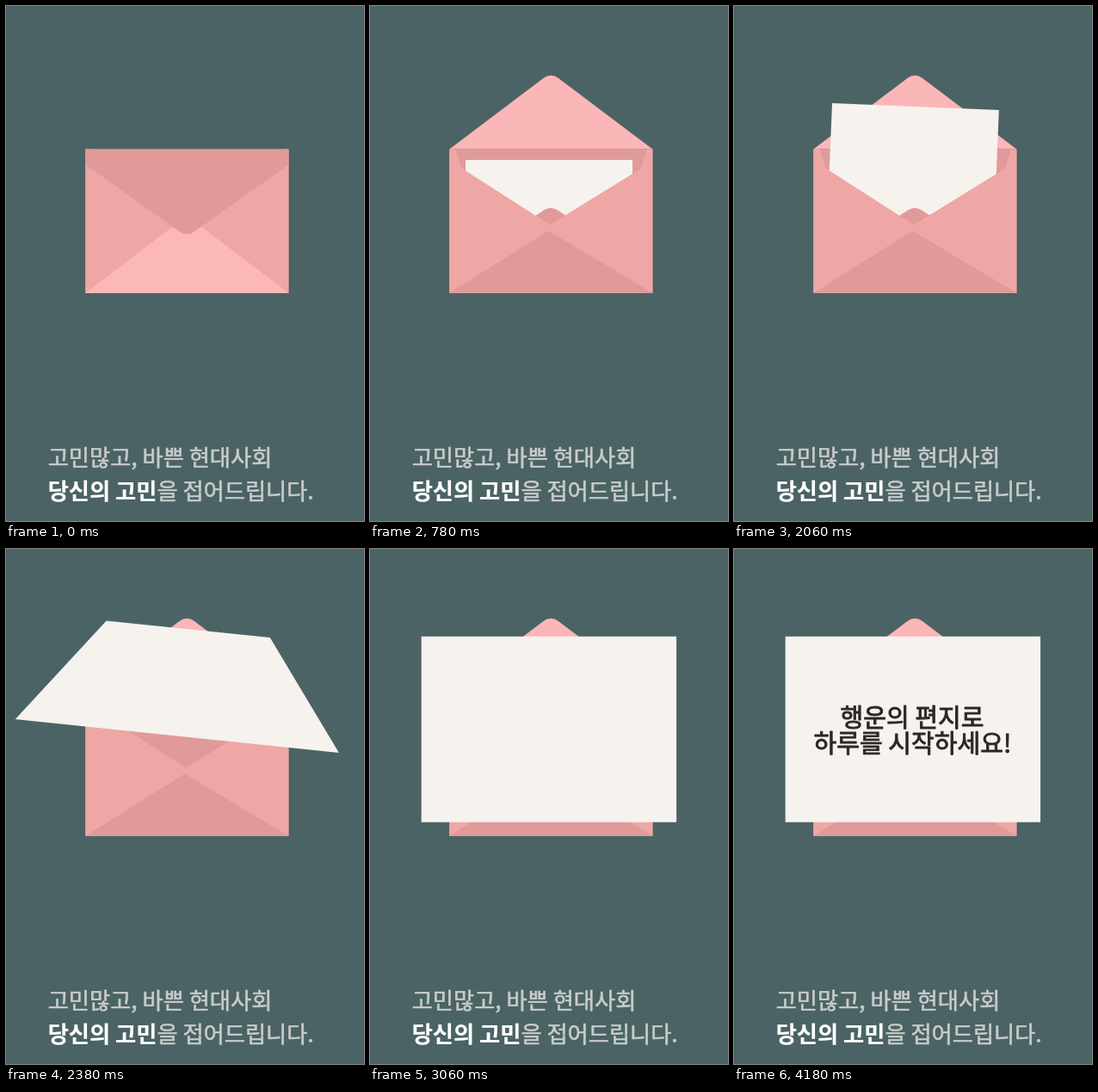
An HTML page with a canvas for the animation above (5060 ms loop, 416 px wide and 599 px high).

```html
<!DOCTYPE html>
<html lang="ko">
<head>
<meta charset="utf-8">
<style>
html, body { margin: 0; width: 100%; height: 100%; overflow: hidden; background: #4b6364; }
canvas { display: block; width: 416px; height: 599px; }
</style>
</head>
<body>
<canvas id="stage" width="416" height="599"></canvas>
<script>
const ctx = document.getElementById('stage').getContext('2d');
const LOOP = 5060, STEP = 40;
const LEFT = 92.3, RIGHT = 328.4, TOP = 166.6, BOTTOM = 333.8, MID = 210.2;
const DARK = [225, 154, 154], SIDE = [238, 167, 165], LIGHT = [252, 184, 185];
const FONT = '"Noto Sans CJK KR", "Noto Sans CJK", "Noto Sans KR", sans-serif';

// time, centre x, centre y, half top width, half bottom width, height, tilt in degrees
const KEYS = [
  [1340, 208, 249.5, 97, 97, 141, 0],
  [1900, 208, 200.5, 97, 97, 141, 0],
  [2060, 208, 187.5, 97, 97, 141, 2.4],
  [2260, 207, 151, 95, 125, 130, 5],
  [2420, 205, 158, 96, 199, 123, 6],
  [2460, 205, 164, 98, 194, 120, 6],
  [2580, 207, 205.5, 111.4, 146.6, 161, 4.9],
  [3060, 207.9, 209.7, 148.2, 148.2, 216, 0]
];
const FRONT_AT = 2260;

const clamp = v => Math.max(0, Math.min(1, v));
const span = (t, a, b) => clamp((t - a) / (b - a));
const lerp = (a, b, p) => a + (b - a) * p;
const smooth = p => p * p * (3 - 2 * p);
const rgb = c => `rgb(${c.map(Math.round).join(',')})`;
const mix = (a, b, p) => rgb(a.map((v, i) => lerp(v, b[i], p)));

function poly(color, points) {
  ctx.fillStyle = color;
  ctx.beginPath();
  points.forEach(([x, y]) => ctx.lineTo(x, y));
  ctx.closePath();
  ctx.fill();
}

// Slope without overshoot at key i for channel c
function slope(i, c) {
  if (i === 0 || i === KEYS.length - 1) return 0;
  const [a, b, d] = [KEYS[i - 1], KEYS[i], KEYS[i + 1]];
  const s0 = (b[c] - a[c]) / (b[0] - a[0]);
  const s1 = (d[c] - b[c]) / (d[0] - b[0]);
  return s0 * s1 <= 0 ? 0 : 2 * s0 * s1 / (s0 + s1);
}

function letterPose(t) {
  t = Math.max(KEYS[0][0], Math.min(KEYS[KEYS.length - 1][0], t));
  let i = 0;
  while (i < KEYS.length - 2 && t >= KEYS[i + 1][0]) i++;
  const a = KEYS[i], b = KEYS[i + 1], d = b[0] - a[0], u = (t - a[0]) / d;
  return a.slice(1).map((v, n) => {
    const c = n + 1;
    return lerp(v, b[c], smooth(u))
      + d * u * (1 - u) * ((1 - u) * slope(i, c) - u * slope(i + 1, c));
  });
}

function drawLetter(t) {
  const [x, y, top, bottom, h, tilt] = letterPose(t);
  ctx.save();
  ctx.translate(x, y);
  ctx.rotate(tilt * Math.PI / 180);
  poly('#f6f2ee', [[-top, -h / 2], [top, -h / 2], [bottom, h / 2], [-bottom, h / 2]]);
  ctx.restore();
}

function drawFlap(turn, color) {
  const f = Math.cos(Math.PI * turn);
  const apex = TOP + f * (f > 0 ? 101.9 : 89.3);
  const side = TOP + 18 * Math.max(f, 0);
  ctx.fillStyle = color;
  ctx.beginPath();
  ctx.moveTo(LEFT, TOP);
  ctx.lineTo(LEFT, side);
  ctx.arcTo(MID, apex, RIGHT, side, 14 * Math.min(1, Math.abs(f)));
  ctx.lineTo(RIGHT, side);
  ctx.lineTo(RIGHT, TOP);
  ctx.closePath();
  ctx.fill();
}

function drawPocket(p) {
  ctx.fillStyle = rgb(DARK);
  ctx.beginPath();
  ctx.moveTo(189, 246);
  ctx.bezierCurveTo(199, 240, 203, 235, MID, 235);
  ctx.bezierCurveTo(217, 235, 221, 240, 231, 246);
  ctx.lineTo(209, 262);
  ctx.fill();
  poly(rgb(SIDE), [
    [LEFT, TOP], [99, TOP], [107, 189], [209, 254.5], [315, 189],
    [322, TOP], [RIGHT, TOP], [RIGHT, BOTTOM], [LEFT, BOTTOM]
  ]);
  poly(mix(LIGHT, DARK, p), [
    [LEFT, BOTTOM], [lerp(MID, 207.5, p), lerp(244, 261.5, p)], [RIGHT, BOTTOM]
  ]);
}

// A thin outline of width `extra` gives a weight between regular and bold
function write(text, x, y, size, weight, color, extra) {
  ctx.font = `${weight} ${size}px ${FONT}`;
  ctx.fillStyle = ctx.strokeStyle = color;
  ctx.lineWidth = extra;
  ctx.lineJoin = 'round';
  ctx.fillText(text, x, y);
  ctx.strokeText(text, x, y);
  return x + ctx.measureText(text).width;
}

function drawMessage(alpha) {
  if (!alpha) return;
  ctx.globalAlpha = alpha;
  ctx.textAlign = 'center';
  write('행운의 편지로', 207, 207, 29.1, 400, '#2b2727', 0.9);
  write('하루를 시작하세요!', 207.5, 237.4, 29.1, 400, '#2b2727', 0.9);
  ctx.textAlign = 'left';
  ctx.globalAlpha = 1;
}

function drawCaption() {
  const grey = '#c9cccb';
  write('고민많고, 바쁜 현대사회', 48.7, 535.3, 26.25, 400, grey, 0.6);
  const x = write('당신의 고민', 48.7, 573.7, 26.25, 700, '#ffffff', 0.2);
  write('을 접어드립니다.', x, 573.7, 26.25, 400, grey, 0.6);
}

function draw(t) {
  const turn = span(t, 60, 600);
  const tint = smooth(turn);
  const flapColor = mix(DARK, [251, 182, 184], tint);
  const open = turn > 0.5;
  const front = t >= FRONT_AT;

  ctx.fillStyle = '#4b6364';
  ctx.fillRect(0, 0, 416, 599);
  ctx.fillStyle = rgb(DARK);
  ctx.fillRect(LEFT, TOP, RIGHT - LEFT, BOTTOM - TOP);
  if (open) drawFlap(turn, flapColor);
  if (!front) drawLetter(t);
  drawPocket(tint);
  if (!open) drawFlap(turn, flapColor);
  if (front) drawLetter(t);
  drawMessage(smooth(span(t, 3460, 4180)));
  drawCaption();
}

const start = performance.now();
function tick() {
  const t = (performance.now() - start) % LOOP;
  draw(Math.max(0, Math.floor((t - 20) / STEP) * STEP + 20));
  requestAnimationFrame(tick);
}
tick();
</script>
</body>
</html>
```
